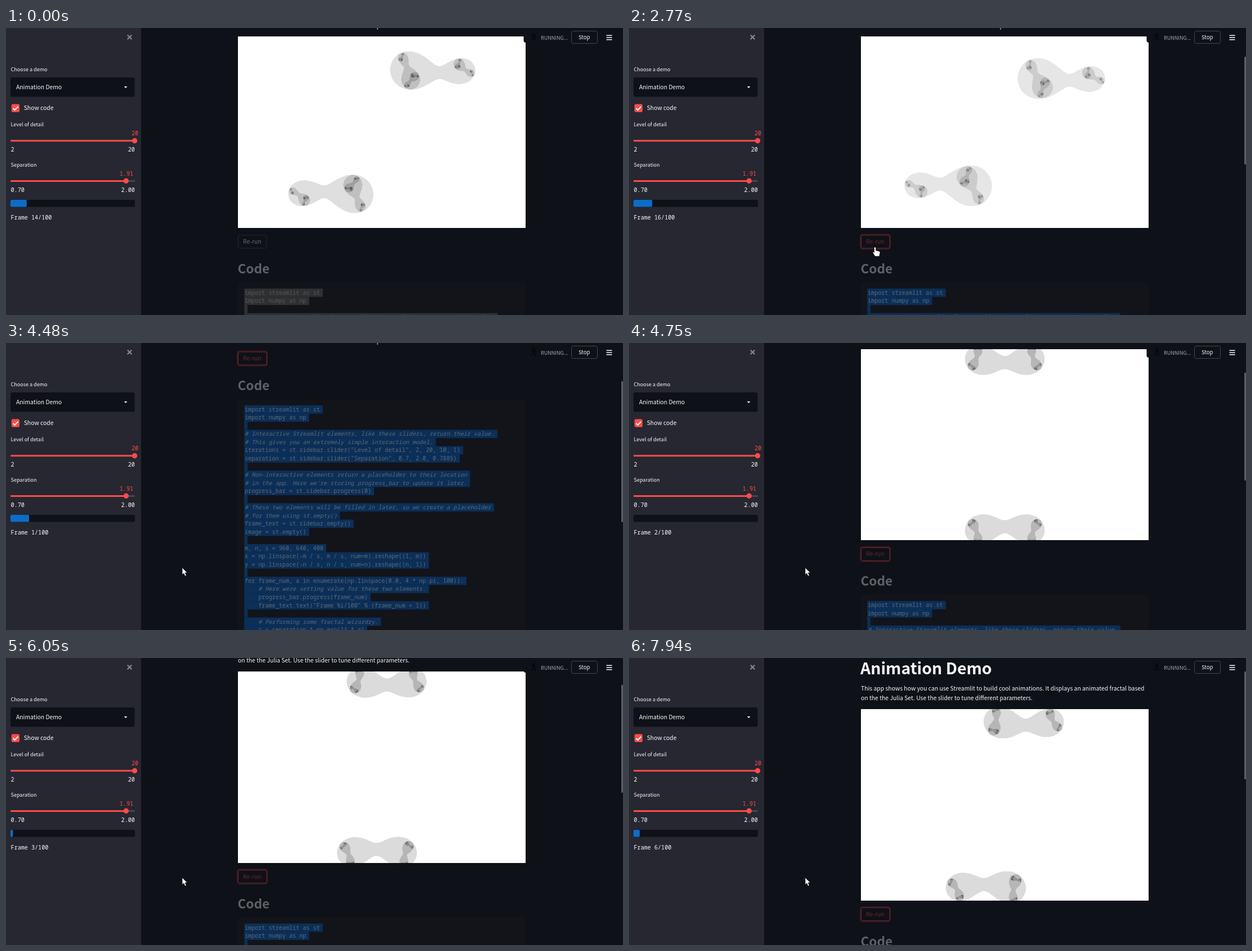
Recreate the animation shown at these times as an HTML page with a canvas. Size 1096 by 511 pixels, loop 8000 ms.

```html
<!DOCTYPE html>
<html lang="en">
<head>
<meta charset="utf-8">
<title>Animation Demo</title>
<style>
html, body { margin: 0; width: 100%; height: 100%; overflow: hidden; background: #0e1117; }
svg, canvas { position: absolute; left: 0; top: 0; }
canvas { left: 412px; width: 511px; height: 340.67px; }
text { white-space: pre; font: 10.36px "Noto Sans CJK JP", "Noto Sans CJK SC", "Noto Sans CJK", "Source Sans Pro", "Open Sans", sans-serif; fill: #fafafa; }
.label { font-size: 9.06px; }
.mono { font: 500 10.13px "Noto Sans Mono", "DejaVu Sans Mono", monospace; }
.red { fill: #ff4b4b; }
.title { font-size: 28.4px; font-weight: 700; }
.head { font-size: 22.6px; font-weight: 700; fill: #5f6164; }
.status { font-size: 9.06px; fill: #aaa5b8; }
.comment { font-style: italic; }
#code rect { fill: #2e3032; }
#code text { fill: #56585b; }
.focus #code rect { fill: #0b2f58; }
.focus #code text { fill: #5f6975; }
#rerun rect { fill: none; stroke: #26292f; }
#rerun text { fill: #66686b; }
.focus #rerun rect { stroke: #70272d; }
.focus #rerun .ring { stroke: #3a1a21; stroke-width: 2; }
.focus #rerun text { fill: #6b262c; }
.ring { stroke: none !important; }
.focus .ring { stroke: #3a1a21 !important; }
</style>
</head>
<body>
<svg id="page" width="1096" height="511">
  <g id="intro">
    <text class="title" x="411" y="-62.5">Animation Demo</text>
    <text x="412" y="-32.7">This app shows how you can use Streamlit to build cool animations. It displays an animated fractal based</text>
    <text x="412" y="-15.7">on the the Julia Set. Use the slider to tune different parameters.</text>
  </g>
  <g id="below">
    <g id="rerun">
      <rect class="ring" x="411" y="352.2" width="53" height="26" rx="4"/>
      <rect x="412.5" y="353.7" width="50.5" height="23" rx="3"/>
      <text x="421" y="368.7">Re-run</text>
    </g>
    <text class="head" x="411.5" y="421.8">Code</text>
    <g id="link" fill="none" stroke="#55575b" stroke-width="1.2">
      <circle cx="391.5" cy="413.5" r="11" fill="#13151b" stroke="none"/>
      <g transform="rotate(-45 391.5 413.5)">
        <path d="M390 410.8h-2.2a2.7 2.7 0 0 0 0 5.4h2.2M393 410.8h2.2a2.7 2.7 0 0 1 0 5.4h-2.2M389 413.5h5"/>
      </g>
    </g>
    <rect x="412" y="437.7" width="511" height="900" rx="3" fill="#12141a"/>
    <g id="code"></g>
    <g id="copy" fill="none" stroke="#6a6c70">
      <path d="M901.5 460.5v-6.500h7M903.500 456.500h7v7.500h-7z"/>
    </g>
  </g>
</svg>
<canvas id="fractal" width="960" height="640"></canvas>
<svg id="ui" width="1096" height="511">
  <rect width="240" height="511" fill="#262730"/>
  <path d="M215.700 12.500l7.600 7.600m0-7.600l-7.600 7.600" stroke="#85868c" stroke-width="2.200"/>
  <text class="label" x="8.500" y="77">Choose a demo</text>
  <rect x="8" y="88" width="220.500" height="34.500" rx="3" fill="#0e1117"/>
  <text x="18" y="109">Animation Demo</text>
  <path d="M209.700 104h5.800l-2.900 3z" fill="#fafafa"/>
  <rect x="9.700" y="135.500" width="14.300" height="14.300" rx="2.500" fill="#ff4b4b"/>
  <path d="M12.500 143l3 3 6-6" fill="none" stroke="#fff" stroke-width="2"/>
  <text x="31.700" y="146">Show code</text>

  <text class="label" x="8.500" y="174.700">Level of detail</text>
  <text class="mono red" x="223" y="190.500">20</text>
  <rect x="8" y="199.200" width="221" height="3" rx="1" fill="#ff4b4b"/>
  <circle cx="228.500" cy="200.700" r="4.700" fill="#ff4b4b"/>
  <text class="mono" x="8.500" y="219.500">2</text>
  <text class="mono" x="216.800" y="219.500">20</text>

  <text class="label" x="8.500" y="246.700">Separation</text>
  <text class="mono red" x="201.800" y="262.500">1.91</text>
  <rect x="8" y="271" width="221" height="3" rx="1" fill="#454851"/>
  <rect x="8" y="271" width="205" height="3" rx="1" fill="#ff4b4b"/>
  <circle cx="213.300" cy="272.300" r="4.700" fill="#ff4b4b"/>
  <text class="mono" x="8.500" y="291.500">0.70</text>
  <text class="mono" x="204.600" y="291.500">2.00</text>

  <rect x="8" y="306" width="221" height="12.500" rx="2" fill="#0e1117"/>
  <rect id="bar" x="8" y="306" height="12.500" rx="2" fill="#0b6dca"/>
  <text id="count" class="mono" x="8.500" y="340.500"></text>

  <rect x="919.500" y="6" width="86" height="20" rx="4" fill="#0e1117"/>
  <path d="M937 12v5l-4 5m4-5l3 3v3m-8-9l5-2 4 4" fill="none" stroke="#06080b" stroke-width="1.800"/>
  <circle cx="938" cy="10.500" r="1.700" fill="#06080b"/>
  <text class="status" x="950" y="20.700">RUNNING...</text>
  <rect x="1004.500" y="5.500" width="46" height="22" rx="3" fill="#0e1117" stroke="#43464d"/>
  <text x="1017" y="20" style="font-size:9.400px">Stop</text>
  <path d="M1066.500 13.200h10m-10 3.800h10m-10 3.800h10" stroke="#fafafa" stroke-width="1.600"/>
  <rect id="scroll" x="1093" width="3" rx="1" fill="#5c5e64"/>

  <path id="arrow" d="M0 0v12.500l2.800-2.600 2.200 5 2.300-1-2.200-4.800h3.900z" fill="#fff" stroke="#000" stroke-width=".6"/>
  <path id="hand" d="M-1.500 1q1.500-2 3 0v5l6 1.500q1.500.5 1.500 2.500l-1.500 6.500h-7.500l-4-6.500q-.5-2 1-1.500l1.500 1.500z" fill="#fff" stroke="#000" stroke-width=".6"/>
</svg>
<script>
const $ = id => document.getElementById(id);
const LOOP = 8000, CHAR = 6.08, LINE = 14.53;

const source = `import streamlit as st
import numpy as np

# Interactive Streamlit elements, like these sliders, return their value.
# This gives you an extremely simple interaction model.
iterations = st.sidebar.slider("Level of detail", 2, 20, 10, 1)
separation = st.sidebar.slider("Separation", 0.7, 2.0, 0.7885)

# Non-interactive elements return a placeholder to their location
# in the app. Here we're storing progress_bar to update it later.
progress_bar = st.sidebar.progress(0)

# These two elements will be filled in later, so we create a placeholder
# for them using st.empty()
frame_text = st.sidebar.empty()
image = st.empty()

m, n, s = 960, 640, 400
x = np.linspace(-m / s, m / s, num=m).reshape((1, m))
y = np.linspace(-n / s, n / s, num=n).reshape((n, 1))

for frame_num, a in enumerate(np.linspace(0.0, 4 * np.pi, 100)):
    # Here were setting value for these two elements.
    progress_bar.progress(frame_num)
    frame_text.text("Frame %i/100" % (frame_num + 1))

    # Performing some fractal wizardry.
    c = separation * np.exp(1j * a)`;

$('code').innerHTML = source.split('\n').map((line, i) => {
  const y = 459.5 + i * LINE;
  const kind = line.trim()[0] === '#' ? 'mono comment' : 'mono';
  return `<rect x="423.300" y="${y - 10.8}" width="${line.length * CHAR + 5.7}" height="${LINE + .1}"/>` +
    `<text class="${kind}" x="424" y="${y}">${line}</text>`;
}).join('');

// Keyframes are [time, value, ...]
function step(keys, t) {
  return keys.filter(k => k[0] <= t).pop()[1];
}
function track(keys, t, col = 1) {
  const j = keys.findIndex(k => k[0] > t);
  if (j < 0) return keys[keys.length - 1][col];
  if (j === 0) return keys[0][col];
  const a = keys[j - 1], b = keys[j];
  return a[col] + (b[col] - a[col]) * (t - a[0]) / (b[0] - a[0]);
}

const counts = [[0, 14], [1960, 15], [2500, 16], [4480, 1], [4700, 2],
  [5360, 3], [6060, 4], [6850, 5], [7590, 6]];
const progress = [[0, 13], [2200, 13], [2330, 14], [2700, 14], [2770, 15], [4480, 15],
  [4700, 0], [4900, 0], [4950, 1], [5560, 1], [5700, 2], [6300, 2], [6590, 3],
  [7140, 3], [7210, 4], [7740, 4], [7940, 5]];
const pointer = [[650, 1088, 506], [720, 1066, 499], [1050, 1066, 499], [1260, 594, 430],
  [1830, 480, 402], [1960, 480, 402], [2240, 437, 390], [3920, 437, 390],
  [4140, 313, 400], [5560, 313, 400], [5700, 313, 391]];

const ctx = $('fractal').getContext('2d');
const picture = ctx.createImageData(960, 640);
const depth = new Uint8Array(960 * 640);
let drawn = -1;

function drawFractal(index) {
  if (index === drawn) return;
  drawn = index;
  const angle = index * 4 * Math.PI / 99;
  const cr = 1.91 * Math.cos(angle), ci = 1.91 * Math.sin(angle);
  let max = 1;
  for (let y = 0, p = 0; y < 640; y++) {
    for (let x = 0; x < 960; x++, p++) {
      let re = -2.4 + 4.8 * x / 959, im = -1.6 + 3.2 * y / 639, n = 0;
      for (let i = 0; i < 20; i++) {
        const next = re * re - im * im + cr;
        im = 2 * re * im + ci;
        re = next;
        if (re * re + im * im > 4) break;
        n = i;
      }
      depth[p] = n;
      if (n > max) max = n;
    }
  }
  depth.forEach((n, p) => {
    const q = p * 4;
    picture.data[q] = picture.data[q + 1] = picture.data[q + 2] = 255 * (1 - n / max);
    picture.data[q + 3] = 255;
  });
  ctx.putImageData(picture, 0, 0);
}

const show = (id, on) => $(id).style.display = on ? '' : 'none';
const move = (id, x, y) => $(id).setAttribute('transform', `translate(${x} ${y})`);

function scrolled(t) {
  if (t < 5910) return 0;
  const u = Math.min(1, (60 + Math.floor((t - 5910) / 80) * 80) / 540);
  return u * u * (3 - 2 * u);
}

function render(t) {
  const count = step(counts, t);
  const empty = count === 1;
  const top = t < 4700 ? 15.3 : 10.7 + 80.3 * scrolled(t);

  // Without the picture, everything below it moves up
  move('intro', 0, top);
  move('below', 0, empty ? top - 353 : top);
  show('fractal', !empty);
  $('fractal').style.top = top + 'px';
  if (!empty) drawFractal(count - 2);

  $('count').textContent = `Frame ${count}/100`;
  $('bar').setAttribute('width', 2.21 * track(progress, t));
  $('page').setAttribute('class', t >= 2300 ? 'focus' : '');
  show('link', t >= 1190 && t < 1750);
  show('copy', t >= 1120 && t < 1400);

  show('scroll', t >= 1050);
  $('scroll').setAttribute('y', empty ? 68 : 51 - (top - 15.3) * .356);
  $('scroll').setAttribute('height', empty ? 251 : 192);

  const x = track(pointer, t, 1), y = track(pointer, t, 2);
  const onButton = x > 412 && x < 463 && y < 393;
  show('arrow', t >= 650 && !onButton);
  show('hand', onButton);
  move('arrow', x, y);
  move('hand', x, y);
}

const start = performance.now();
function tick() {
  render((performance.now() - start) % LOOP);
  requestAnimationFrame(tick);
}
tick();
</script>
</body>
</html>
```
